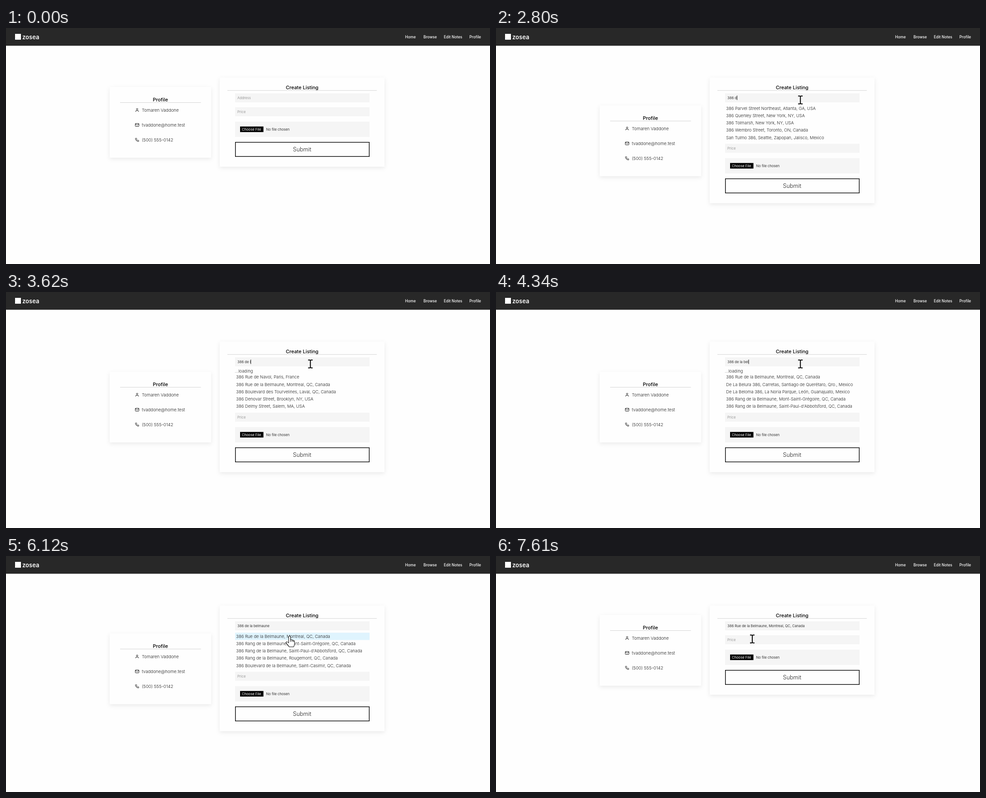
These frames come from a looping animation (1069x524 px, 8000 ms). An HTML page:

```html
<!DOCTYPE html>
<html lang="en">
<head>
<meta charset="utf-8">
<title>Create Listing</title>
<style>
  html, body { margin: 0; width: 100%; height: 100%; overflow: hidden; background: #fefefe; }
  svg { display: block; width: 1069px; height: 524px; font-family: Inter, "Open Sans", sans-serif; }
  text { white-space: pre; fill: #222; font-size: 9.35px; font-weight: 300; }
  .card { fill: #fefefe; filter: drop-shadow(0 3px 5px rgba(0, 0, 0, .08)); }
  .field { fill: #f5f5f5; }
  .rule { stroke: #d4d4d4; stroke-width: 1; }
  .title { font-size: 10.9px; font-weight: 500; fill: #000; text-anchor: middle; }
  .small { font-size: 7.6px; font-weight: 400; fill: #333; }
  .hint { fill: #979797; }
  .light { fill: #fff; }
  .nav text { font-size: 8.35px; font-weight: 450; fill: #fff; }
  .brand { font-size: 13px; font-weight: 600; fill: #fff; }
  .person text { font-size: 9.6px; }
  .submit { font-size: 12.5px; text-anchor: middle; }
  .icon { fill: none; stroke: #111; stroke-width: 2.4; stroke-linejoin: round; }
  .pointer { fill: #fff; stroke: #111; stroke-width: 1.1; stroke-linejoin: round; }
  .beam { fill: none; stroke: #000; stroke-width: 2; }
  .halo { fill: none; stroke: #fff; stroke-width: 3.4; }
</style>
</head>
<body>
<svg viewBox="0 0 1069 524">
  <rect width="1069" height="39.4" fill="#282828"/>
  <rect x="20" y="13" width="13" height="13" fill="#fff"/>
  <text class="brand" x="36" y="24.5">zosea</text>
  <g class="nav">
    <text x="881.5" y="23">Home</text>
    <text x="922" y="23">Browse</text>
    <text x="967" y="23">Edit Notes</text>
    <text x="1023.5" y="23">Profile</text>
  </g>

  <g id="profile">
    <rect class="card" x="229" y="131" width="224" height="157"/>
    <text class="title" x="341" y="163">Profile</text>
    <path class="rule" d="M252 165.5H430.5"/>
    <g class="person">
      <g class="icon" transform="translate(284.8 177.5) scale(.4)">
        <circle cx="12" cy="7" r="4"/>
        <path d="M20 21v-2a4 4 0 0 0-4-4H8a4 4 0 0 0-4 4v2"/>
      </g>
      <text x="300" y="185.7">Tomaren Vaddone</text>
      <g class="icon" transform="translate(284.8 210.5) scale(.4)">
        <rect x="2" y="4" width="20" height="16" rx="2"/>
        <path d="M2 6l10 7L22 6"/>
      </g>
      <text x="300" y="218.7">tvaddone@home.test</text>
      <g class="icon" transform="translate(284.8 243.5) scale(.4)">
        <path d="M21 16.4v3a2 2 0 0 1-2.2 2A19.5 19.5 0 0 1 2.6 5.2 2 2 0 0 1 4.6 3h3a2 2 0 0 1 2 1.7l.9 3.1-2 2a16 16 0 0 0 5.8 5.8l2-2 3.1.9a2 2 0 0 1 1.6 1.9z"/>
      </g>
      <text x="300" y="251.7">(500) 555-0142</text>
    </g>
  </g>

  <rect id="listing" class="card" x="472" y="110" width="364" height="198"/>
  <text class="title" x="654" y="136">Create Listing</text>
  <path class="rule" d="M489 138.7H819"/>
  <rect class="field" x="506" y="145" width="297" height="20"/>
  <text id="address" class="small" x="511" y="157.8"></text>

  <text id="loading" x="505.5" y="179">...loading</text>
  <g id="list">
    <rect id="hover" x="506" y="170.3" width="297" height="16.2" fill="#dff4fe"/>
  </g>

  <g id="lower">
    <rect class="field" x="506" y="176" width="297" height="20"/>
    <text class="small hint" x="511" y="189">Price</text>
    <rect class="field" x="506" y="208" width="297" height="34"/>
    <rect x="517" y="218.7" width="51.6" height="12.4"/>
    <text class="small light" x="521" y="228">Choose File</text>
    <text class="small" x="574.5" y="228">No file chosen</text>
    <rect x="506.7" y="253.7" width="295.6" height="31.6" fill="#fefefe" stroke="#000" stroke-width="1.4"/>
    <text class="submit" x="654" y="273.6">Submit</text>
  </g>

  <rect id="caret" width=".9" height="10" fill="#111"/>

  <g id="cursor">
    <path id="arrow" class="pointer" d="M0 0V18L4.2 14.2 7 20.5 10 19.2 7.3 13H13.2Z"/>
    <g id="beam">
      <path class="halo" d="M-5.5-8.5H5.5M0-8.5V9M-5.5 9H5.5"/>
      <path class="beam" d="M-5-8.5H-1.5L0-7.5 1.5-8.5H5M0-8V8.5M-5 9H-1.5L0 8 1.5 9H5"/>
    </g>
    <g id="hand" class="pointer">
      <path d="M-2 1.5Q0-1.2 2.2 1.5V8.5Q4.2 7.2 5.6 9.3Q7.6 8.3 8.7 10.4Q11 10 11 13V18Q10.5 21 9 24.3H-1Q-3 20.5-7 16.5Q-8.6 14-6.5 13Q-4.5 12.8-2 15.5Z"/>
      <path fill="none" d="M2.2 8.5V13M5.6 9.3V13M8.7 10.4V13.5"/>
    </g>
  </g>
</svg>

<script>
const LOOP = 8000, ROW = 16.2, LOADING = 10.7;
const $ = id => document.getElementById(id);
const show = (id, on) => $(id).setAttribute('visibility', on ? 'inherit' : 'hidden');
const shift = (id, x, y) => $(id).setAttribute('transform', `translate(${x} ${y})`);

const picked = '386 Rue de la Belmaune, Montreal, QC, Canada';
const rang = '386 Rang de la Belmaune, ';
const early = [
  '386 Parvel Street Northeast, Atlanta, GA, USA',
  '386 Quenley Street, New York, NY, USA',
  '386 Tolmarsh, New York, NY, USA',
  '386 Wembro Street, Toronto, ON, Canada',
  'San Tulmo 386, Seattle, Zapopan, Jalisco, Mexico'
];
const partial = [
  '386 Rue de Navol, Paris, France',
  picked,
  '386 Boulevard des Tourvelines, Laval, QC, Canada',
  '386 Denovar Street, Brooklyn, NY, USA',
  '386 Delmy Street, Salem, MA, USA'
];
const mixed = [
  picked,
  'De La Belura 386, Carretas, Santiago de Querétaro, Qro., Mexico',
  'De La Beloma 386, La Noria Parque, León, Guanajuato, Mexico',
  rang + 'Mont-Saint-Grégoire, QC, Canada',
  rang + "Saint-Paul-d'Abbotsford, QC, Canada"
];
const final = [
  picked,
  rang + 'Mont-Saint-Grégoire, QC, Canada',
  rang + "Saint-Paul-d'Abbotsford, QC, Canada",
  rang + 'Rougemont, QC, Canada',
  '386 Boulevard de la Belmaune, Saint-Casimir, QC, Canada'
];

// Typing: the time at which each character is entered
const typed = '386 de la belmaune';
const keys = [1870, 2000, 2270, 2400, 2800, 3000, 3240, 3620, 3680, 3810,
              4010, 4210, 4290, 4430, 4560, 4890, 5090, 5160];

// Suggestions: time, rows, loading line
const results = [
  [0, [], false], [2600, [], true], [2800, early, false], [3000, early, true],
  [3150, partial, false], [3240, partial, true], [3420, partial, false],
  [3620, partial, true], [3750, mixed, false], [4210, mixed, true],
  [4360, mixed, false], [4560, mixed, true], [4690, mixed, false],
  [5360, mixed, true], [5490, final, false], [6460, [], false]
];

// Cursor moves: start, end, positions, from, to
const moves = [
  [190, 330, 3, [1034, 489], [852, 264]],
  [530, 1010, 8, [825, 240], [672.3, 159.5]],
  [5840, 6120, 5, [668, 161], [626.3, 177.5]],
  [6660, 7080, 7, [616, 180], [566, 184]]
];

const caretOn = [[1010, 1470], [1870, 5690], [6190, 6460], [7150, 7610]];
const within = (t, [a, b]) => t >= a && t < b;
const latest = (list, t) => list.filter(item => item[0] <= t).pop();

const rows = Array.from({ length: 5 }, (_, i) => {
  const row = document.createElementNS('http://www.w3.org/2000/svg', 'text');
  row.setAttribute('x', 508.3);
  row.setAttribute('y', 181.7 + i * ROW);
  return $('list').appendChild(row);
});

function cursorAt(t) {
  const move = latest(moves, t);
  if (!move) return null;
  const [start, end, count, from, to] = move;
  const step = (end - start) / (count - 1);
  const k = Math.min(count - 1, Math.floor((t - start) / step + .001));
  return from.map((v, i) => v + (to[i] - v) * k / (count - 1));
}

function drawCursor(t, drop) {
  const spot = cursorAt(t);
  show('cursor', spot);
  if (!spot) return;
  const [x, y] = spot;
  const hand = within(t, [6050, 6660]);
  const inField = x > 506 && x < 803 &&
    (within(y, [145, 165]) || within(y - drop, [176, 196]));
  shift('cursor', x, y);
  show('hand', hand);
  show('beam', !hand && inField);
  show('arrow', !hand && !inField);
}

function render(t) {
  const [, items, loading] = latest(results, t);
  const offset = loading ? LOADING : 0;
  const drop = Math.round(items.length * ROW + offset);
  const value = t >= 6660 ? picked : typed.slice(0, keys.filter(k => k <= t).length);

  const address = $('address');
  address.textContent = value || 'Address';
  address.classList.toggle('hint', !value);

  rows.forEach((row, i) => row.textContent = items[i] || '');
  shift('list', 0, offset);
  shift('lower', 0, drop);
  shift('profile', 0, Math.round(drop / 2));
  $('listing').setAttribute('height', 198 + drop);
  show('loading', loading);
  show('hover', within(t, [6050, 6460]));

  const inPrice = t >= 7000;
  const width = value && !inPrice ? address.getComputedTextLength() : 0;
  shift('caret', 511 + width, inPrice ? 181.5 : 150);
  show('caret', caretOn.some(span => within(t, span)));
  drawCursor(t, drop);
}

const begin = performance.now();
function tick() {
  render((performance.now() - begin) % LOOP);
  requestAnimationFrame(tick);
}
tick();
</script>
</body>
</html>
```
